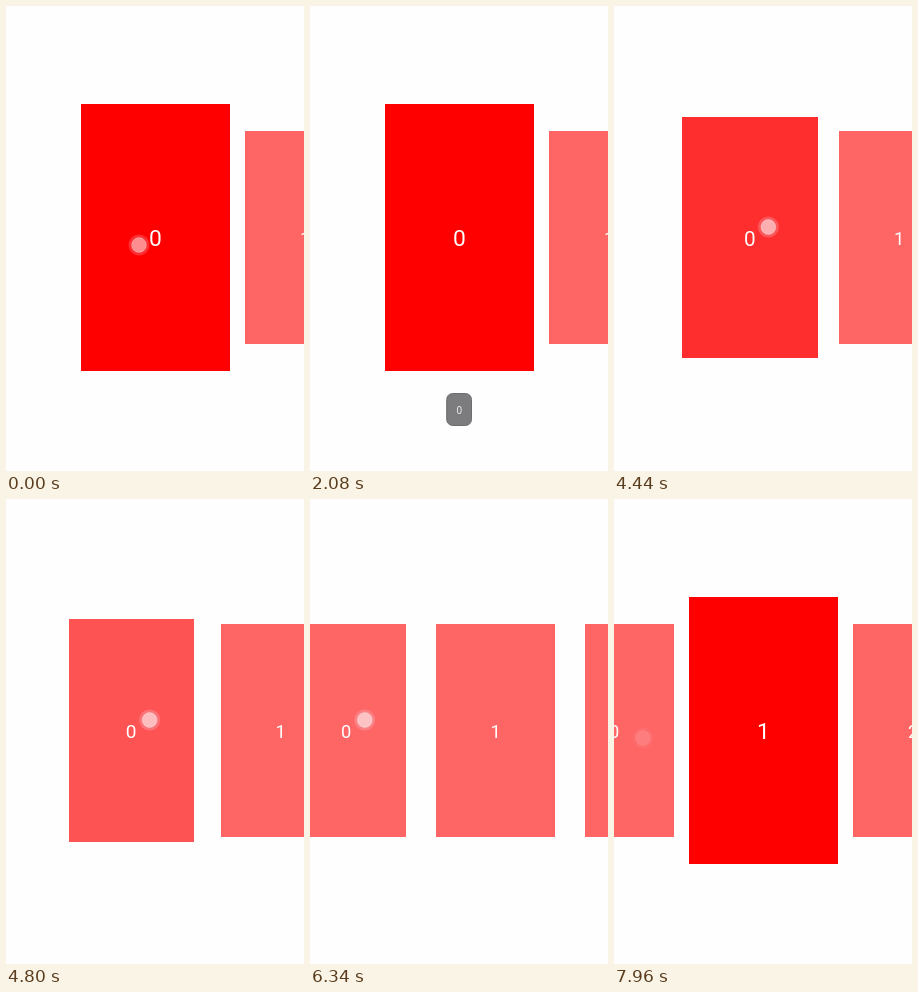
These frames come from a looping animation (298x465 px, 8000 ms). An HTML page:

```html
<!DOCTYPE html>
<html lang="en">
<head>
<meta charset="utf-8">
<title>Card pager</title>
<style>
  html, body { margin: 0; width: 100%; height: 100%; overflow: hidden; background: #fefefe; }
  svg { display: block; width: 298px; height: 465px; }
  text { font-family: Roboto, "Noto Sans", sans-serif; text-anchor: middle; fill: #fff; }
</style>
</head>
<body>
<svg viewBox="0 0 298 465">
  <rect width="298" height="465" fill="#fefefe"/>
  <g id="cards"></g>
  <g id="toast">
    <rect x="136.7" y="387.5" width="24.8" height="32" rx="6" fill="#727274" stroke="#626264"/>
    <text x="149.3" y="407.8" font-size="10" fill-opacity=".85">0</text>
  </g>
  <g id="touch">
    <circle r="10.5" fill="#f4d8e4" opacity=".24"/>
    <circle r="7.4" fill="#fff" fill-opacity=".52" stroke="#fff" stroke-opacity=".3"/>
  </g>
</svg>
<script>
const LOOP = 8000, STEP = 135.33, PHASE = 91, LAG = 20;
const PAGE_W = 149.5, PAGE_H = 266.5, MID_X = 149.5, MID_Y = 231.5;
const MIN_SCALE = 0.8, MIN_ALPHA = 0.6;
const GRIP = 22, SLOP = 3.4, SLOP_SCROLL = .02;

// time and pages scrolled at the turns of the finger's speed
const DRAG = [
  [3900, 0], [4170, .02], [4800, .187], [5070, .299],
  [5370, .48], [5640, .567], [6340, .759], [6910, .889], [7300, 1]
];
const TAPS = [
  { from: -200, to: 270, x: 133, y: 239 },
  { from: 2440, to: 3010, x: 270.5, y: 226.5 },
  { from: 7690, to: 8040, x: 29, y: 239 }
];
const SWIPE = { from: 3830, to: 7200, y: 221 };

const el = id => document.getElementById(id);
const set = (node, attrs) => {
  for (const name in attrs) node.setAttribute(name, attrs[name]);
  return node;
};
const make = (tag, parent, attrs) =>
  parent.appendChild(set(document.createElementNS("http://www.w3.org/2000/svg", tag), attrs));
const clamp = v => Math.min(1, Math.max(0, v));
const pulse = (t, from, to, fadeIn, fadeOut) =>
  clamp(Math.min((t - from) / fadeIn, (to - t) / fadeOut));

const cards = [0, 1, 2].map(n => {
  const group = make("g", el("cards"), {});
  make("rect", group, {
    x: -PAGE_W / 2, y: -PAGE_H / 2, width: PAGE_W, height: PAGE_H,
    fill: "#f00", "shape-rendering": "crispEdges"
  });
  make("text", group, { y: 8.8, "font-size": 22.8 }).textContent = n;
  return group;
});

function scrollAt(t) {
  return DRAG.slice(1).reduce((sum, [time, pages], i) => {
    const [lastTime, lastPages] = DRAG[i];
    return sum + (pages - lastPages) * clamp((t - lastTime) / (time - lastTime));
  }, 0);
}

function drawCards(scroll) {
  cards.forEach((card, n) => {
    const pos = n - scroll;
    const scale = Math.max(MIN_SCALE, 1 - Math.abs(pos));
    const alpha = MIN_ALPHA + (scale - MIN_SCALE) / (1 - MIN_SCALE) * (1 - MIN_ALPHA);
    set(card, {
      transform: `translate(${MID_X + pos * PAGE_W} ${MID_Y}) scale(${scale})`,
      opacity: alpha
    });
  });
}

function drawToast(t) {
  const age = Math.max(0, t - 130);
  const rise = 23 * Math.exp(-.0038 * age) * Math.cos(.0083 * age);
  set(el("toast"), { transform: `translate(0 ${rise})`, opacity: pulse(t, 60, 2590, 200, 550) });
}

function drawTouch(t, scroll) {
  const swipeX = MID_X + GRIP - scroll * PAGE_W - SLOP * clamp(scroll / SLOP_SCROLL);
  const touch = TAPS.find(tap => t >= tap.from && t < tap.to) ?? { ...SWIPE, x: swipeX };
  set(el("touch"), {
    transform: `translate(${touch.x} ${touch.y})`,
    opacity: pulse(t, touch.from, touch.to, 60, 300)
  });
}

function draw(t) {
  // the drag is shown at the recorder's low frame rate
  const frameTime = PHASE + STEP * Math.floor((t - PHASE) / STEP) + LAG;
  const scroll = scrollAt(frameTime);
  drawCards(scroll);
  drawToast(t);
  drawTouch(t, scroll);
}

function tick() {
  draw(performance.now() % LOOP);
  requestAnimationFrame(tick);
}
tick();
</script>
</body>
</html>
```
